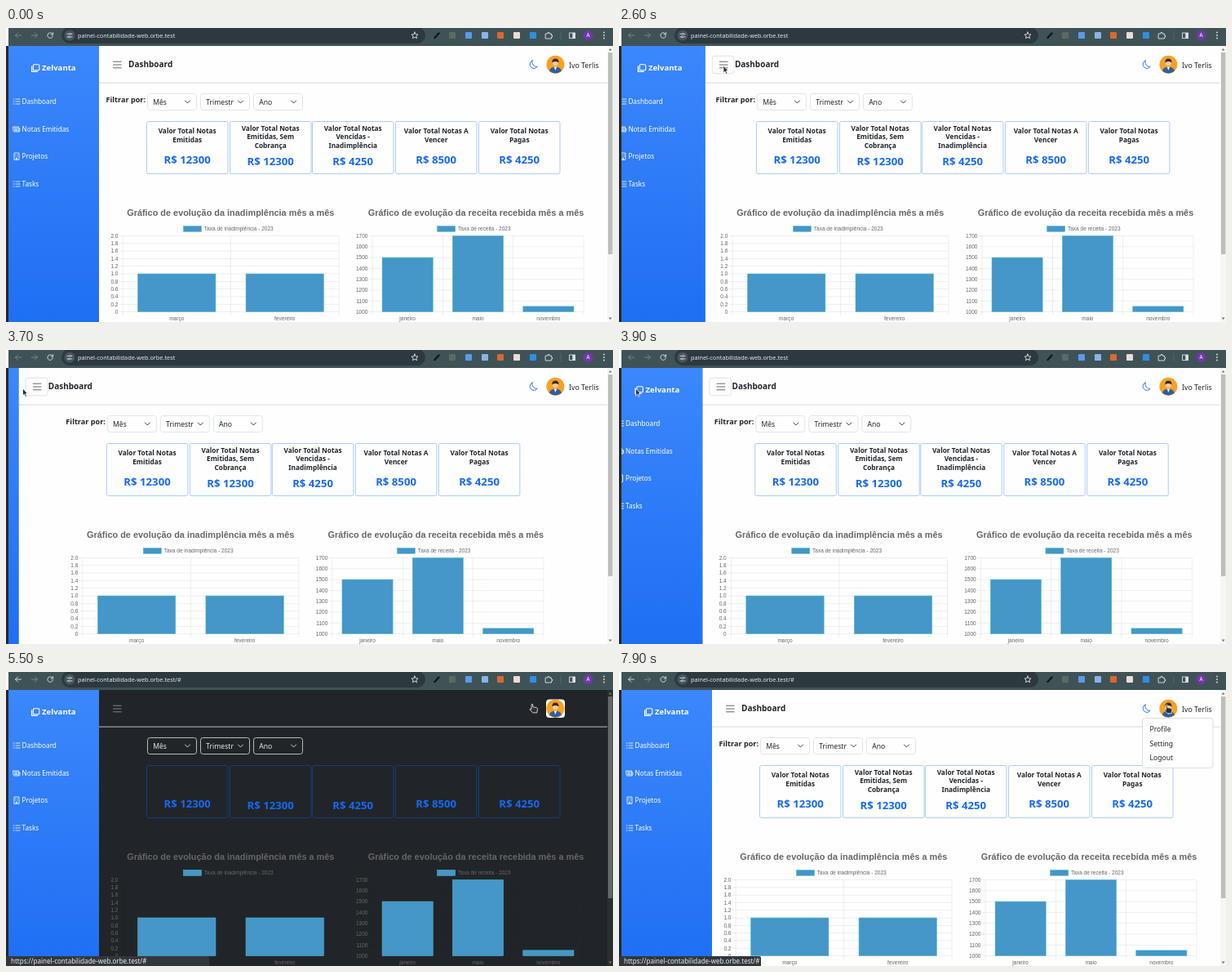
An HTML page for the animation above (8000 ms loop, 744 by 360 pixels).

```html
<!DOCTYPE html>
<html lang="pt-BR">
<head>
<meta charset="utf-8">
<title>Dashboard</title>
<style>
  html, body { margin: 0; width: 100%; height: 100%; overflow: hidden; }
  svg { display: block; font-family: "Noto Sans", sans-serif; --bg: #fefefe; --ink: #212529; --line: #dee2e6; --rule: #d8dadd;
        --card: #a6c6f8; --field: #212529; --track: #f6f6f6; --thumb: #bdbdbd; --menu: #555; }
  svg.dark { --bg: #212529; --line: #c9cccf; --rule: #b9bcbe; --card: #123f86; --field: #e4e7ea;
             --track: #2b2d2f; --thumb: #66686a; --menu: #8b8e91; }
  .ink { fill: var(--ink); }
  .chart { font: 6.54px "Liberation Sans", Arial, sans-serif; fill: #666; }
  .icon { fill: none; stroke-width: .9; stroke-linecap: round; stroke-linejoin: round; }
</style>
</head>
<body>
<svg id="stage" width="744" height="360" viewBox="0 0 744 360"></svg>
<script>
const stage = document.getElementById('stage');
const LOOP = 8000, SIDEBAR = 111, BLUE = '#1769f2';
const HOST = 'painel-contabilidade-web.orbe.test';

const text = (x, y, size, str, attrs = 'class="ink"') =>
  `<text x="${x}" y="${y}" font-size="${size}" ${attrs}>${str}</text>`;
const rect = (x, y, w, h, fill, attrs = '') =>
  `<rect x="${x}" y="${y}" width="${w}" height="${h}" fill="${fill}" ${attrs}/>`;
const circle = (x, y, r, fill, attrs = '') =>
  `<circle cx="${x}" cy="${y}" r="${r}" fill="${fill}" ${attrs}/>`;
const icon = (d, color, attrs = '') => `<path class="icon" d="${d}" stroke="${color}" ${attrs}/>`;
const group = (id, body, attrs = '') => `<g id="${id}" ${attrs}>${body}</g>`;

function toolbar() {
  const light = '#dfe3e4';
  const extensions = [[547, '#5b6a63'], [567, '#5a9be8'], [587, '#8ab4e8'], [606, '#d9682f'], [626, '#ecdcd4'], [646, '#2f8fe0']];
  return rect(0, 0, 3, 22, '#fefefe') + rect(3, 0, 741, 22, '#3f5357') +
    rect(68, -1, 446, 20, '#2d393e', 'rx="10"') +
    icon('M18.5 9H11.5M14.7 5.8L11.5 9L14.7 12.2', '#74787c', 'id="back"') +
    icon('M31.5 9H38.5M35.3 5.8L38.5 9L35.3 12.2', '#7d898c') +
    icon('M57.2 7.6A3.3 3.3 0 1 0 57.5 9.6M57.6 5.6V8H55.2', light) +
    circle(78, 9, 6.6, '#44545a') +
    icon('M75 7.3H77M80 7.3H81M75 10.9H76M79 10.9H81', light) +
    circle(78.6, 7.3, 1, 'none', `stroke="${light}" stroke-width=".8"`) +
    circle(77.4, 10.9, 1, 'none', `stroke="${light}" stroke-width=".8"`) +
    text(88, 12, 7.3, HOST + '<tspan id="hash">/#</tspan>', 'fill="#e6e8ea"') +
    icon('M501 5L502.2 7.7L505 8L502.9 9.9L503.5 12.7L501 11.2L498.5 12.7L499.1 9.9L497 8L499.8 7.7Z', light) +
    icon('M525.5 12L530.5 6.5', '#11161a', 'style="stroke-width:2.4"') +
    extensions.map(([x, fill]) => rect(x - 4, 5, 8, 8, fill, 'rx="1"')).join('') +
    icon('M661.5 7H664V5.6H666V7H668.4V9H669.6V11H668.4V13H661.5Z', light) +
    rect(679.5, 4, .8, 10, '#5c6b70') +
    rect(690.6, 6, 6.8, 6.6, 'none', `stroke="${light}" stroke-width=".9"`) + rect(694.3, 6, 3.2, 6.6, light) +
    circle(713.5, 9, 6, '#7238a8') + text(713.5, 11.3, 6.3, 'A', 'fill="#fff" text-anchor="middle"') +
    [5.5, 9, 12.5].map(y => circle(733, y, .9, light)).join('');
}

function sidebar() {
  const list = 'M12 -3H17M12 0H17M12 3H17M9.2 -3H10M9.2 0H10M9.2 3H10';
  const items = [
    ['Dashboard', 90, list],
    ['Notas Emitidas', 124, 'M9 -3H15.5V3H10Q9 3 9 2ZM15.5 -1H17V2Q17 3 15.5 3M10.5 -1.4H14M10.5 .2H14M10.5 1.6H14'],
    ['Projetos', 157, 'M10 4V-4H16V4ZM11.7 -2H12M14 -2H14.3M11.7 0H12M14 0H14.3M12.3 4V2H13.7V4'],
    ['Tasks', 191, list],
  ];
  return rect(3, 22, SIDEBAR, 338, 'url(#blue)') +
    rect(33.4, 44.8, 7.4, 7, 'none', 'rx="1" stroke="#fff" stroke-width="1.1"') +
    icon('M31.6 47V53.4H38.5', '#fff', 'style="stroke-width:1.3"') +
    text(44, 52.4, 9.6, 'Zelvanta', 'fill="#fff" font-weight="700"') +
    items.map(([label, y, d]) =>
      icon(d, '#e8f0ff', `transform="translate(0 ${y})"`) +
      text(19.5, y + 3.1, 8.2, label, 'fill="#fff"')).join('');
}

function filters() {
  return text(122.5, 91.3, 9.1, 'Filtrar por:', 'class="ink" font-weight="600"') +
    ['Mês', 'Trimestr', 'Ano'].map((label, i) => {
      const x = 173.5 + i * 65;
      return rect(x, 80.5, 60, 20, 'var(--bg)', 'rx="3" stroke="var(--line)" stroke-width=".9"') +
        text(x + 6.7, 93.8, 8.6, label, 'fill="var(--field)"') +
        icon(`M${x + 46} 89l3 3l3 -3`, 'var(--field)');
    }).join('');
}

function cards() {
  const data = [
    [12300, 'Valor Total Notas', 'Emitidas'],
    [12300, 'Valor Total Notas', 'Emitidas, Sem', 'Cobrança'],
    [4250, 'Valor Total Notas', 'Vencidas -', 'Inadimplência'],
    [8500, 'Valor Total Notas A', 'Vencer'],
    [4250, 'Valor Total Notas', 'Pagas'],
  ];
  return data.map(([value, ...lines], i) => {
    const x = Math.round(172 + i * 101.7) + .5, mid = x + 49.7, tall = lines.length > 2;
    return rect(x, 114.5, 99.5, 64, 'none', 'rx="2" stroke="var(--card)" stroke-width=".9"') +
      lines.map((line, n) => text(mid, (tall ? 125.8 : 129.4) + n * 10.6, 8.3, line,
        'class="ink" font-weight="600" text-anchor="middle"')).join('') +
      text(mid, tall ? 168.4 : 165.6, 13.2, 'R$ ' + value, `fill="${BLUE}" font-weight="700" text-anchor="middle"`);
  }).join('');
}

function chart({ left, right, center, title, legend, swatch, min, max, step, digits, bars }) {
  const top = 254.5, base = 347.5, slot = (right - left) / bars.length;
  const toY = v => base - (v - min) / (max - min) * (base - top);
  const border = 'stroke="#4bc0c0" stroke-width=".55"', grid = 'rgba(0,0,0,.1)', fill = '#4596c9';
  let out = text(center, 230, 10.9, title, 'font-weight="700" text-anchor="middle"') +
    rect(swatch, 242.5, 22, 6.8, fill, border) + text(swatch + 25.3, 248.2, 6.54, legend, '');
  const count = Math.round((max - min) / step);
  for (let i = 0; i <= count; i++) {
    const value = min + i * step, y = toY(value);
    out += rect(left - 4, y - .25, right - left + 4, .6, grid) +
      text(left - 5.5, y + 2.3, 6.54, value ? value.toFixed(digits) : 0, 'text-anchor="end"');
  }
  for (let i = 0; i <= bars.length; i++) out += rect(left + i * slot - .25, top, .6, base - top + 4.5, grid);
  bars.forEach(([label, value], i) => {
    const mid = left + (i + .5) * slot, w = slot * .72, y = toY(value);
    out += rect(mid - w / 2, y, w, base - y, fill, border) + text(mid, 358, 6.54, label, 'text-anchor="middle"');
  });
  return `<g class="chart">${out}</g>`;
}

const charts = () =>
  chart({ left: 143, right: 408, center: 275.3, title: 'Gráfico de evolução da inadimplência mês a mês',
    legend: 'Taxa de inadimplência - 2023', swatch: 217.5, min: 0, max: 2, step: .2, digits: 1,
    bars: [['março', 1], ['fevereiro', 1]] }) +
  chart({ left: 449, right: 708, center: 576, title: 'Gráfico de evolução da receita recebida mês a mês',
    legend: 'Taxa de receita - 2023', swatch: 528.7, min: 1000, max: 1700, step: 100, digits: 0,
    bars: [['janeiro', 1500], ['maio', 1700], ['novembro', 1050]] });

const avatar = () =>
  rect(662, 33.5, 23, 22.5, '#fff', 'rx="4"') + circle(673.4, 44.7, 11, '#f5a225') +
  '<path d="M666 52.8Q666.5 48 673.4 47.5Q680.3 48 680.8 52.8Q673.4 58 666 52.8Z" fill="#2f5f9e"/>' +
  '<path d="M671.7 47.6L673.4 52L675.1 47.6Z" fill="#fff"/>' +
  circle(673.4, 42.6, 3.7, '#f3c9a0') + '<path d="M669.4 42.4Q669 37.6 673.4 37.6Q677.8 37.6 677.4 42.4Q673.4 39.6 669.4 42.4Z" fill="#38291f"/>';

const scrollbar = () =>
  rect(737, 22, 7, 338, 'var(--track)') + rect(738, 30, 5.4, 247, 'var(--thumb)') +
  '<path d="M738.6 27.6L740.6 25L742.6 27.6ZM738.6 354.6L740.6 357.2L742.6 354.6Z" fill="#777"/>';

const dropdown = () =>
  rect(641.5, 56.5, 86.5, 61, '#fff', 'rx="3" stroke="#d3d5d7" stroke-width=".8"') +
  ['Profile', 'Setting', 'Logout'].map((label, i) => text(650.5, 73.3 + i * 17.3, 8.6, label)).join('');

stage.innerHTML =
  '<defs><linearGradient id="blue" x2="0" y2="1"><stop stop-color="#3b87fc"/><stop offset="1" stop-color="#1f6ff3"/></linearGradient></defs>' +
  rect(0, 0, 744, 360, 'var(--bg)') +
  group('content', filters() + cards() + charts()) +
  rect(0, 66.6, 737, 1, 'var(--rule)') +
  group('heading',
    rect(122.3, 34.2, 27, 21.6, 'none', 'id="hover" rx="3" stroke="#d9dcdf" stroke-width=".8"') +
    icon('M131.5 41.2H141.2M131.5 45H141.2M131.5 48.8H141.2', 'var(--menu)') +
    text(150, 48.2, 10, 'Dashboard', 'class="ink" font-weight="600"')) +
  icon('M645.2 39.8A5 5 0 1 0 651.2 47.3A5.6 5.6 0 0 1 645.2 39.8Z', BLUE, 'id="moon"') +
  avatar() + text(690, 48.6, 8.8, 'Ivo Terlis') +
  group('sidebar', sidebar()) + rect(0, 22, 3, 338, '#25282b') +
  scrollbar() + toolbar() + group('dropdown', dropdown()) +
  group('status', rect(0, 348, 174, 14, '#33373b', 'id="bubble" rx="2"') +
    text(6, 357, 8, `https://${HOST}/#`, 'fill="#eceef0"')) +
  group('cursor',
    '<path id="arrow" d="M0 0V8.8L2 7.1L3.4 10.2L4.9 9.5L3.6 6.5H6Z"/>' +
    '<path id="hand" d="M2.6 6V1Q3.4 0 4.2 1V4L9 5Q10.2 5.4 10 6.8L9.2 11.2H4.2L.6 7.4Q.4 6.2 1.6 6.2L2.6 7Z"/>',
    'fill="#303030" stroke="#f4f4f4" stroke-width=".8" stroke-linejoin="round"');

const el = Object.fromEntries([...stage.querySelectorAll('[id]')].map(node => [node.id, node]));
const show = (node, on) => node.style.display = on ? '' : 'none';
const move = (node, x, y = 0) => node.setAttribute('transform', `translate(${x} ${y})`);
const clamp = v => Math.min(1, Math.max(0, v));
const ease = v => (1 - Math.cos(Math.PI * clamp(v))) / 2;

// Pointer path: time, x, y
const path = [[1100, 299, 180], [1500, 188, 72], [2000, 127, 45], [2300, 128, 46], [2600, 128, 46], [2800, 119, 58],
  [3300, 15, 44], [3400, 17.5, 44], [3600, 20.5, 47], [4000, 20.5, 47], [4600, 607, 58], [4900, 638, 43],
  [5200, 641.5, 38.7], [7100, 641.5, 38.7], [7400, 668, 39.5], [8000, 668, 39.5]];

function pointer(t) {
  const i = path.findIndex(p => p[0] > t);
  if (i < 1) return path[0].slice(1);
  const [t0, x0, y0] = path[i - 1], [t1, x1, y1] = path[i], k = (t - t0) / (t1 - t0);
  return [x0 + (x1 - x0) * k, y0 + (y1 - y0) * k];
}

function draw(t) {
  const shift = SIDEBAR * (ease((t - 2540) / 350) - ease((t - 3624) / 350));
  const dark = t >= 5400 && t < 6200, visited = t >= 5400, hand = t >= 4950;
  stage.classList.toggle('dark', dark);
  move(el.sidebar, -shift);
  move(el.heading, -shift);
  move(el.content, -shift / 2);
  move(el.cursor, ...pointer(t));
  show(el.cursor, t >= 1000);
  show(el.arrow, !hand);
  show(el.hand, hand);
  show(el.hover, (t >= 2000 && t < 2650) || (t >= 3250 && t < 4000));
  show(el.moon, !dark);
  show(el.hash, visited);
  el.back.setAttribute('stroke', visited ? '#dfe3e4' : '#7d898c');
  show(el.status, t >= 5000);
  el.bubble.setAttribute('width', t < 6200 ? 249 : 174);
  show(el.dropdown, t >= 7500);
}

function frame(now) {
  draw(now % LOOP);
  requestAnimationFrame(frame);
}
draw(0);
requestAnimationFrame(frame);
</script>
</body>
</html>
```
